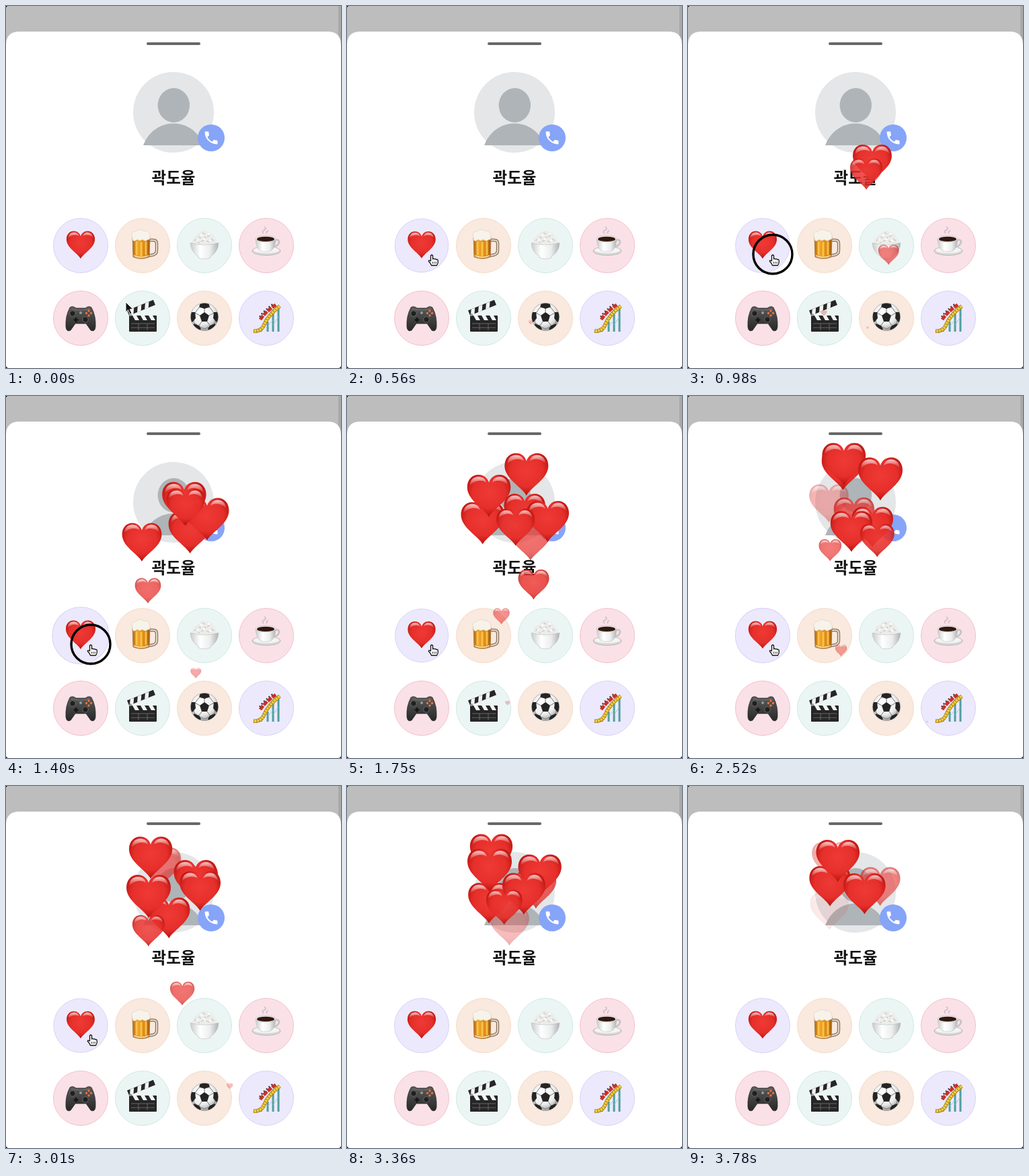
An HTML page that plays this animation: 498x538 px, repeating every 3850 ms.

```html
<!DOCTYPE html>
<html lang="ko">
<head>
<meta charset="utf-8">
<title>Reactions</title>
<style>
  html, body { margin: 0; width: 100%; height: 100%; overflow: hidden; background: #fff; }
  svg { display: block; width: 498px; height: 538px; }
  .name { font: 700 23.5px "Noto Sans CJK KR", "Noto Sans CJK", "Noto Sans KR", sans-serif; text-anchor: middle; fill: #111; }
  .lavender { fill: #ece9fd; stroke: #d8d2f7; }
  .peach { fill: #f9e9de; stroke: #f6dcca; }
  .mint { fill: #ebf6f4; stroke: #cee9e2; }
  .pink { fill: #fae1e7; stroke: #f5bfcc; }
</style>
</head>
<body>
<svg viewBox="0 0 498 538" xmlns="http://www.w3.org/2000/svg">
  <defs>
    <radialGradient id="red" cx=".5" cy=".42" r=".6">
      <stop offset="0" stop-color="#ee3a35"/><stop offset=".62" stop-color="#e62f2b"/>
      <stop offset=".85" stop-color="#c81c17"/><stop offset="1" stop-color="#a30d07"/>
    </radialGradient>
    <linearGradient id="gloss" x2="0" y2="1">
      <stop offset="0" stop-color="#fff" stop-opacity=".75"/><stop offset="1" stop-color="#fff" stop-opacity="0"/>
    </linearGradient>
    <linearGradient id="beer">
      <stop offset="0" stop-color="#b5690f"/><stop offset=".3" stop-color="#f0a524"/>
      <stop offset=".75" stop-color="#d98512"/><stop offset="1" stop-color="#9c560c"/>
    </linearGradient>
    <linearGradient id="china">
      <stop offset="0" stop-color="#c9cbcc"/><stop offset=".35" stop-color="#fff"/>
      <stop offset=".7" stop-color="#eceded"/><stop offset="1" stop-color="#aeb1b3"/>
    </linearGradient>
    <linearGradient id="dark" x2="0" y2="1">
      <stop offset="0" stop-color="#5a5a5a"/><stop offset="1" stop-color="#282828"/>
    </linearGradient>
    <radialGradient id="ball" cx=".42" cy=".35" r=".65">
      <stop offset="0" stop-color="#fff"/><stop offset=".65" stop-color="#ededed"/><stop offset="1" stop-color="#a3a3a3"/>
    </radialGradient>
    <clipPath id="ballClip"><circle cy="-2" r="20.3"/></clipPath>

    <g id="heart">
      <path fill="url(#red)" d="M0 32C-7 19-33 7-33-13C-33-25-25-32-16-32C-8-32-2-27 0-20C2-27 8-32 16-32C25-32 33-25 33-13C33 7 7 19 0 32Z"/>
      <path fill="url(#gloss)" d="M-29-15C-29-24-23-29-16-29C-9-29-5-25-4-20C-10-25-22-24-29-15Z"/>
      <path fill="url(#gloss)" d="M5-20C6-25 10-29 16-29C23-29 28-24 29-16C22-24 11-25 5-20Z"/>
    </g>

    <g id="mug">
      <path d="M10-8H16Q21-8 21-3V7Q21 13 15 14L10 15" fill="none" stroke="#8b735c" stroke-width="4.4"/>
      <path d="M10-8H16Q21-8 21-3V7Q21 13 15 14L10 15" fill="none" stroke="#e2d8ca" stroke-width="2"/>
      <path d="M-15-13H11L10 17Q-2 22-14 17Z" fill="url(#beer)" stroke="#a98055"/>
      <path d="M-9-5V13M-2-4V15M5-5V13" stroke="#ffd05b" stroke-width="3" stroke-linecap="round" opacity=".75"/>
      <path d="M-13 15Q-2 20 9 15" fill="none" stroke="#f4dab0" stroke-width="1.6"/>
      <path d="M-16-15Q-17-21-10-21Q-5-26 2-22Q10-22 11-15Q12-8 8-9Q4-5 0-9Q-4-6-8-9Q-14-4-15-10Z" fill="#f7f3ea" stroke="#d9cfbe" stroke-width=".6"/>
    </g>

    <g id="rice">
      <path d="M-19-2Q-18-14-9-17Q-3-25 5-21Q13-18 15-12Q19-9 19-2Z" fill="#ececea"/>
      <path d="M-15-7L-11-10M-9-13L-5-11M-3-19L1-17M4-13L8-15M10-10L14-7M-5-6L-1-8M3-7L7-5M-10-5L-7-4M0-13L2-11" stroke="#c7c6c2" stroke-width="1.3"/>
      <path d="M-12-9L-9-8M-6-16L-3-15M5-18L8-17M8-9L9-6M-2-10L1-9" stroke="#fff" stroke-width="2"/>
      <path d="M-21-4Q0 2 21-4Q20 10 9 16V18Q0 22-9 18V16Q-20 10-21-4Z" fill="url(#china)" stroke="#b8babb" stroke-width=".6"/>
    </g>

    <g id="coffee">
      <path d="M-4-18Q-8-21-3-23Q1-25-3-28M1-18Q-1-21 3-22" fill="none" stroke="#b6aab0" stroke-width="1.5" opacity=".7"/>
      <ellipse cy="8" rx="21" ry="6.5" fill="#d9d9d9" stroke="#a3a3a3" stroke-width=".7"/>
      <ellipse cy="6.7" rx="19" ry="4.5" fill="#f4f4f4"/>
      <path d="M11-8Q19-10 19-5Q18 1 9 2" fill="none" stroke="#c4c4c4" stroke-width="2.6"/>
      <path d="M-16-10Q-15 8-5 9H3Q13 8 14-10Z" fill="url(#china)" stroke="#bbb" stroke-width=".5"/>
      <ellipse cx="-1" cy="-10" rx="15" ry="4.8" fill="#f1f1f1" stroke="#b5b5b5" stroke-width=".6"/>
      <ellipse cx="-1" cy="-9.6" rx="13" ry="3.7" fill="#32170f"/>
    </g>

    <g id="pad">
      <path d="M-16-16Q-12-19-7-15H7Q12-19 16-16Q23-3 22 13Q21 21 15 18L8 8H-8L-15 18Q-21 21-22 13Q-23-3-16-16Z" fill="url(#dark)" stroke="#222" stroke-width=".7"/>
      <path d="M-14-14Q0-10 14-14" fill="none" stroke="#777"/>
      <g fill="#202020" stroke="#777" stroke-width=".8"><circle cx="-12" cy="-7" r="4.2"/><circle cx="7" cy="2" r="4.2"/></g>
      <path d="M-7-1V6M-10.5 2.5H-3.5" stroke="#161616" stroke-width="2.6"/>
      <g fill="#f0713d"><circle cx="12" cy="-11" r="1.7"/><circle cx="12" cy="-4" r="1.7"/><circle cx="8.5" cy="-7.5" r="1.7"/><circle cx="15.5" cy="-7.5" r="1.7"/></g>
      <circle cy="-8" r="2" fill="#999"/>
    </g>

    <g id="clapper">
      <g transform="translate(-20 -4) rotate(-22)">
        <rect y="-8" width="42" height="8" fill="#262626"/>
        <path d="M5-8H11L7 0H1ZM17-8H23L19 0H13ZM29-8H35L31 0H25Z" fill="#f3f3f3"/>
      </g>
      <rect x="-20" y="-4" width="41" height="24" rx="1" fill="#262626"/>
      <path d="M-15-4H-9L-5 3H-11ZM-3-4H3L7 3H1ZM9-4H15L19 3H13Z" fill="#f3f3f3"/>
      <path d="M-17 8H18M-17 14H18M-6 8V18M7 8V18" stroke="#777" stroke-width=".8"/>
      <circle cx="-18" cy="-5" r="2" fill="#999"/>
    </g>

    <g id="soccer">
      <circle cy="-2" r="20.5" fill="url(#ball)" stroke="#8d8d8d" stroke-width=".6"/>
      <g clip-path="url(#ballClip)">
        <g id="patch"><path d="M0-9L7-4L4 5H-4L-7-4Z" fill="#242424"/></g>
        <path d="M0-9V-17M7-4L14-8M4 5L9 12M-4 5L-9 12M-7-4L-14-8M-9 12L0 16L9 12L16 6L14-8L8-16H-8L-14-8L-16 6Z" fill="none" stroke="#777"/>
        <path d="M-8-17L0-14L8-17L5-25H-5ZM14-9L13 0L18 6L24 0V-9ZM-14-9L-13 0L-18 6L-24 0V-9ZM8 11L16 8L18 16L9 20L5 16ZM-8 11L-16 8L-18 16L-9 20L-5 16Z" fill="#242424"/>
      </g>
    </g>

    <g id="coaster">
      <path d="M-8 15V20M2 5V20M10-7V20M18-15V20" stroke="#4f9f9e" stroke-width="3"/>
      <path d="M2 12L10 3M10 10L18-2" stroke="#8fc6c2" stroke-width=".8"/>
      <path d="M-19 19Q-7 20-3 9Q3-5 20-18" fill="none" stroke="#9a7615" stroke-width="5.4"/>
      <path d="M-19 19Q-7 20-3 9Q3-5 20-18" fill="none" stroke="#f3cf3c" stroke-width="4"/>
      <path d="M-19 19Q-7 20-3 9Q3-5 20-18" fill="none" stroke="#a5811c" stroke-width="4" stroke-dasharray="1 3"/>
      <path d="M-9 2Q-2-9 14-20" fill="none" stroke="#c93128" stroke-width="5" stroke-dasharray="7 1.5"/>
      <path d="M-10-2Q-3-12 11-22" fill="none" stroke="#583936" stroke-width="2.6" stroke-dasharray="2 3"/>
    </g>
  </defs>

  <rect width="498" height="538" fill="#bdbdbd"/>
  <rect x="494" width="4" height="60" fill="#a9a9a9"/>
  <path d="M0 538V58Q0 38 20 38H478Q498 38 498 58V538Z" fill="#fff"/>
  <path d="M0 534Q0 538 4 538H0ZM498 534Q498 538 494 538H498ZM0 0H2L0 2Z" fill="#000"/>
  <rect x="209" y="54" width="80" height="4" rx="2" fill="#686868"/>

  <circle cx="249" cy="158" r="60" fill="#e4e6e8"/>
  <ellipse cx="249.300" cy="147.500" rx="23.700" ry="25.500" fill="#aeb4b7"/>
  <path d="M204 207C212 186 230 174.500 249 174.500S286 186 294 207Z" fill="#aeb4b7"/>
  <circle cx="305" cy="196" r="20" fill="#86a4f8"/>
  <path transform="translate(292.400 183.400) scale(1.050)" fill="#fff" d="M6.620 10.790c1.440 2.830 3.760 5.140 6.590 6.590l2.200-2.200c.27-.27.67-.36 1.020-.24 1.120.37 2.330.57 3.570.57.55 0 1 .45 1 1V20c0 .55-.45 1-1 1-9.390 0-17-7.610-17-17 0-.55.45-1 1-1h3.500c.55 0 1 .45 1 1 0 1.250.2 2.450.57 3.570.11.35.03.74-.25 1.020z"/>
  <text class="name" x="249" y="264">곽도율</text>

  <g id="buttons"></g>
  <g id="hearts"></g>
  <circle id="press" cx="126" cy="369" r="29" fill="none" stroke="#000" stroke-width="3.400"/>
  <g id="hand">
    <path d="M-1.500 1Q0-1 1.500 1V6Q3 4.500 4 6.300Q6 5 6.700 7Q9 6 9.300 8.500V11Q9 13 7.500 15.500H-.5Q-2 12-4.500 9.500Q-5 7-1.500 9Z" fill="#fff" stroke="#111" stroke-width="1.300" stroke-linejoin="round"/>
    <path d="M1.500 10V13M4 10V13M6.300 10V13" stroke="#111" stroke-width=".8"/>
  </g>
  <path id="arrow" d="M0 0V15L3.500 11.700L6.200 18L9 16.800L6.300 10.700H11Z" fill="#111" stroke="#fff"/>
</svg>

<script>
const LOOP = 3850, STEP = 70, RISE = 700, FALL = 900;
const svgNS = "http://www.w3.org/2000/svg";
const $ = id => document.getElementById(id);
const clamp = v => Math.max(0, Math.min(1, v));

const buttons = [
  ["lavender", "heart"], ["peach", "mug"], ["mint", "rice"], ["pink", "coffee"],
  ["pink", "pad"], ["mint", "clapper"], ["peach", "soccer"], ["lavender", "coaster"]
].map(([tint, icon], i) => ({ tint, icon, x: 111 + 92 * (i % 4), y: i < 4 ? 356 : 464 }));

$("buttons").innerHTML = buttons.map(({ tint, icon, x, y }) => {
  const fit = icon === "heart" ? ' transform="translate(0 -1) scale(.64)"' : "";
  return `<g transform="translate(${x} ${y})"><circle class="${tint}" r="40.5"/><use href="#${icon}"${fit}/></g>`;
}).join("");
const heartButton = $("buttons").firstChild;

// launch time, start x, start y, peak x, peak y, drop while fading
const hearts = [
  [525, 273, 500, 274, 197, 31], [644, 265, 500, 265, 157, 40],
  [790, 297, 540, 299, 177, 33], [930, 202, 500, 202, 183, 45],
  [960, 267, 500, 267, 112, 44], [1150, 211, 500, 211, 141, 25],
  [1309, 300, 497, 248, 147, 58], [1435, 290, 550, 275, 163, 74],
  [1605, 228, 460, 231, 103, 25], [1711, 240, 500, 232, 97, 35],
  [1837, 350, 430, 286, 123, 40], [1981, 240, 511, 243, 184, 33],
  [2155, 276, 480, 282, 136, 30], [2310, 210, 297, 212, 164, 26],
  [2420, 235, 480, 215, 97, 20], [2505, 360, 500, 287, 127, 35],
  [2674, 211, 458, 212, 125, 53], [2779, 260, 503, 263, 150, 30],
  [2960, 360, 500, 223, 108, 25]
].map(([t0, x0, y0, x1, y1, drop]) => {
  const el = document.createElementNS(svgNS, "use");
  el.setAttribute("href", "#heart");
  $("hearts").append(el);
  return { el, t0, x0, y0, x1, y1, drop };
});
const clicks = [...hearts.map(h => h.t0), 1020];

// points are [time, ...values]
function track(points, t) {
  const i = points.findIndex(p => p[0] > t);
  if (i < 0) return points[points.length - 1].slice(1);
  if (i === 0) return points[0].slice(1);
  const a = points[i - 1], b = points[i], k = (t - a[0]) / (b[0] - a[0]);
  return a.slice(1).map((v, n) => v + (b[n + 1] - v) * k);
}

const bounce = [[0, 1.02], [40, .975], [85, 1.045], [250, 1]];
const route = [
  [0, 178, 440], [70, 386, 452], [140, 386, 452], [280, 310, 450],
  [420, 165, 405], [500, 126, 370], [3080, 126, 370], [3360, 134, 545]
];

function show(el, on) { el.setAttribute("visibility", on ? "visible" : "hidden"); }

function drawHeart(h, t) {
  const age = t - h.t0;
  const u = clamp(age / RISE), g = clamp((age - RISE) / FALL);
  const rest = (1 - u) ** 2;
  const alive = age > 0 && g < .9;
  show(h.el, alive);
  if (!alive) return;
  const x = h.x1 + (h.x0 - h.x1) * (1 - u) ** 3 - 2 * g;
  const y = h.y1 + (h.y0 - h.y1) * rest + h.drop * g;
  const size = 1 - rest - .15 * g;
  const opacity = clamp(.2 + .9 * (1 - rest)) * clamp((.9 - g) / .45);
  h.el.setAttribute("transform", `translate(${x} ${y}) scale(${size})`);
  h.el.setAttribute("opacity", opacity);
}

function drawPointer(t) {
  const [x, y] = track(route, t);
  const over = t >= STEP && buttons.some(b => Math.hypot(b.x - x, b.y - y) < 41);
  show($("hand"), over);
  show($("arrow"), !over && y < 538);
  for (const id of ["hand", "arrow"]) $(id).setAttribute("transform", `translate(${x} ${y})`);
}

function draw(now) {
  const t = Math.floor(now % LOOP / STEP) * STEP;
  hearts.forEach(h => drawHeart(h, t));
  const last = Math.max(...hearts.map(h => h.t0).filter(t0 => t0 <= t));
  const scale = last > 0 ? track(bounce, t - last)[0] : 1;
  heartButton.setAttribute("transform", `translate(111 356) scale(${scale})`);
  show($("press"), clicks.some(c => t >= c - 60 && t < c));
  drawPointer(t);
}

const start = performance.now();
function tick() {
  draw(performance.now() - start);
  requestAnimationFrame(tick);
}
tick();
</script>
</body>
</html>
```
